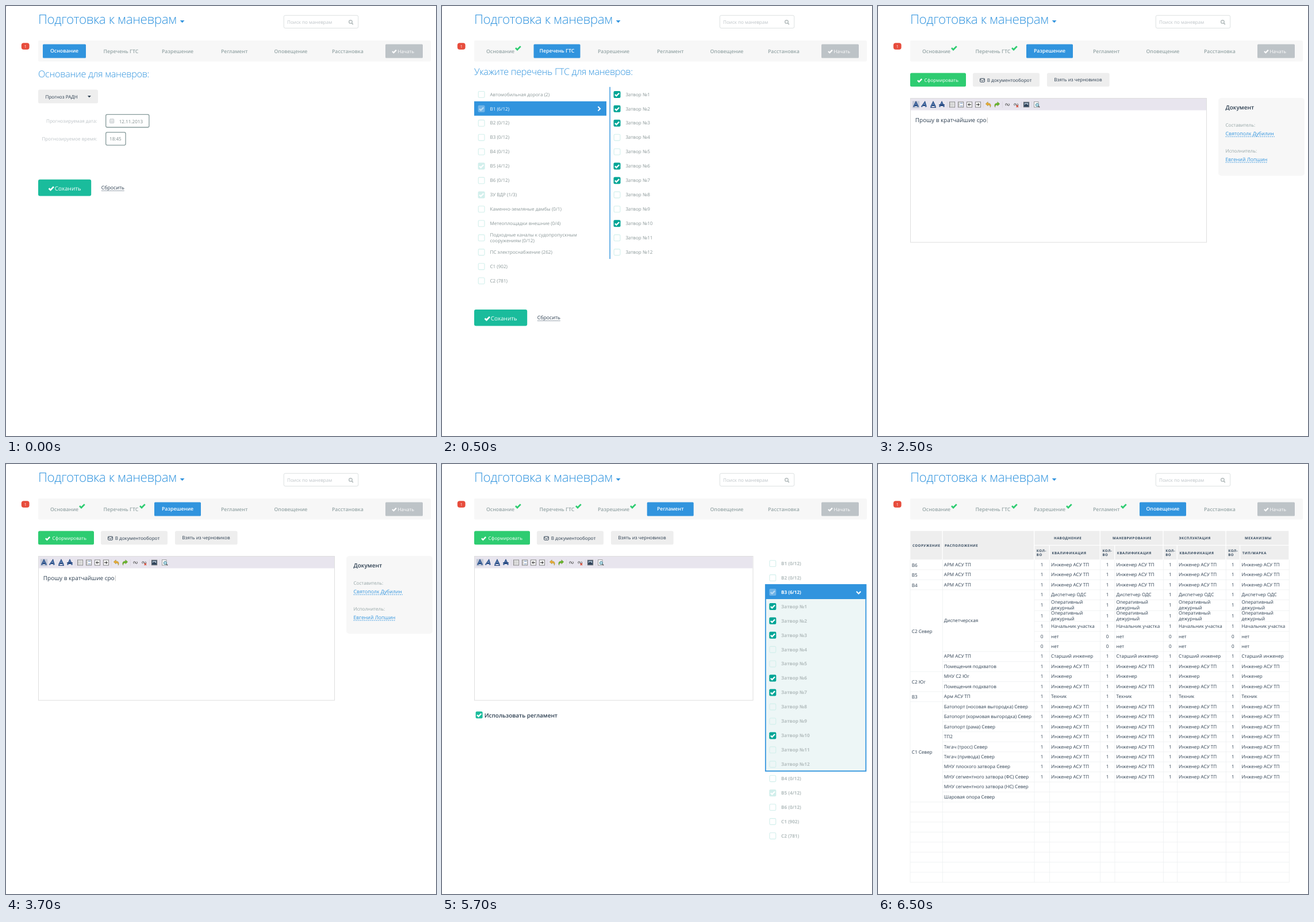
An HTML page that plays this animation: 748x748 px, repeating every 8 s.

```html
<!DOCTYPE html>
<html lang="ru">
<head>
<meta charset="utf-8">
<title>Подготовка к маневрам</title>
<style>
html, body { margin: 0; width: 100%; height: 100%; overflow: hidden; background: #fff; }
svg { display: block; width: 100%; height: 100%; font-family: "Open Sans", "Noto Sans", sans-serif; }
text { white-space: pre; text-rendering: geometricPrecision; }
.narrow { font-stretch: 75%; }
.title { letter-spacing: -.018em; }
.head { letter-spacing: .55px; }
</style>
</head>
<body>
<svg id="stage" viewBox="0 0 748 748"></svg>
<script>
const BLUE = '#3194de', GREEN = '#2ecc71', TEAL = '#1abc9c', DEEP = '#00a596';
const DARK = '#2c3e50', GREY = '#95a5a6', PALE = '#bdc3c7', MIST = '#d2efec', PANEL = '#eeeeee';
const S = 8.1, M = 8.73, L = 9.97;
const STEP = 24.94;

const text = (x, y, s, size = S, fill = DARK, weight = 400, extra = '') =>
  `<text x="${x}" y="${y}" font-size="${size}" fill="${fill}" font-weight="${weight}" ${extra}>${s}</text>`;
const title = (x, y, s, size) => text(x, y, s, size, BLUE, 300, 'class="title"');
const rect = (x, y, w, h, fill, r = 0, extra = '') =>
  `<rect x="${x}" y="${y}" width="${w}" height="${h}" rx="${r}" fill="${fill}" ${extra}/>`;
const frame = (x, y, w, h, color, r = 0, width = 1) =>
  rect(x, y, w, h, 'none', r, `stroke="${color}" stroke-width="${width}"`);
const line = (d, color, width = 1, extra = '') =>
  `<path d="${d}" fill="none" stroke="${color}" stroke-width="${width}" ${extra}/>`;
const fill = (d, color) => `<path d="${d}" fill="${color}"/>`;
const at = (x, y, s) => `<g transform="translate(${x} ${y})">${s}</g>`;
const tick = (x, y, color, k = 1) => at(x, y, line(`M${-3.6 * k} ${.1 * k}L${-1.1 * k} ${2.5 * k}L${3.7 * k} ${-2.4 * k}`, color, 2.3 * k));
const caret = (x, y, w, h, color) => fill(`M${x} ${y}h${w}l${-w / 2} ${h}z`, color);

// Checkbox states: 0 empty, 1 checked, 2 partly checked, 3 partly checked on blue
function box(x, y, state) {
  if (!state) return frame(x - 5.4, y - 5.4, 10.8, 10.8, MIST, 1.8, 1.1);
  const back = [, DEEP, MIST, 'rgba(255,255,255,.3)'][state];
  const mark = state === 3 ? 'rgba(255,255,255,.5)' : '#fff';
  return rect(x - 6, y - 6, 12, 12, back, 2) + tick(x, y, mark);
}

const TABS = [
  ['Основание', 77, 64, 75, 132], ['Перечень ГТС', 169.5, 159.5, 81, 237],
  ['Разрешение', 271, 258, 81, 332], ['Регламент', 374, 356.7, 81, 427],
  ['Оповещение', 466.5, 455, 81, 0], ['Расстановка', 567, 0, 0, 0]
];

function header() {
  return rect(0, 0, 1, 1, '#bbb')
    + title(56, 31.2, 'Подготовка к маневрам', 22.44)
    + caret(302.7, 25, 7.8, 4.2, BLUE)
    + frame(483.3, 16.3, 129.4, 22.2, '#dde1e2', 2.5)
    + text(489, 31, 'Поиск по маневрам', S, PALE)
    + `<circle cx="599.4" cy="27.6" r="2.8" fill="none" stroke="#b3bbbc" stroke-width="1.4"/>`
    + line('M601.4 29.6l2.4 2.5', '#b3bbbc', 1.7)
    + rect(26.8, 64.3, 13.8, 11.4, '#e74c3c', 4)
    + text(33.7, 72.6, '1', 7, '#fff', 400, 'text-anchor="middle"')
    + rect(56, 60, 683, 36.6, '#f7f7f7', 2)
    + rect(660, 66.4, 65, 24, PALE, 1.5)
    + tick(675.4, 78.9, '#fff', .95) + text(681.5, 81.6, 'Начать', S, '#fff');
}

function tabs(active) {
  return TABS.map(([name, x, left, width, mark], i) => {
    const on = i === active;
    return (on ? rect(left, 66.4, width, 24, BLUE, 1.5) : '')
      + text(x, on ? 81.1 : 81.6, name, M, on ? '#fff' : GREY, 600)
      + (i < active ? tick(mark + .3, 73, GREEN, 1.2) : '');
  }).join('');
}

const saveRow = y => rect(56, y, 92.2, 28.6, TEAL, 3)
  + tick(78.7, y + 15.4, '#fff', 1.15) + text(84.7, y + 18.8, 'Соханить', L, '#fff')
  + text(165.8, y + 17.2, 'Сбросить', M) + line(`M165.8 ${y + 19.6}h40`, '#7d8a96', .8);

function basis() {
  const end = 'text-anchor="end"', edge = '#869a9b';
  return title(56, 123.8, 'Основание для маневров:', 16.2)
    + rect(56, 145.5, 104, 23.7, PANEL, 2.5) + text(68.5, 160.9, 'Прогноз РАДН') + caret(141.9, 156, 6, 3.3, DARK)
    + text(158.4, 202.6, 'Прогнозируемая дата:', S, PALE, 400, end)
    + text(158.4, 233.6, 'Прогнозируемое время:', S, PALE, 400, end)
    + frame(173.7, 188.6, 75.2, 22.4, edge, 2.5, 1.3) + frame(173.7, 219.7, 34.4, 22.4, edge, 2.5, 1.3)
    + frame(180.7, 197, 7, 6.6, PALE, .5, .9)
    + line('M180.5 199.2h7.4M180.5 201.4h7.4M183 199v4.4M185.4 199v4.4', PALE, .6)
    + line('M182.6 195.8v1.8M185.8 195.8v1.8', PALE, 1.1)
    + text(196.7, 203.8, '12.11.2013', S, '#7f8c8d') + text(180, 233.8, '18:45', S, '#7f8c8d')
    + saveRow(301.8);
}

const GATES = Array.from({ length: 12 }, (_, i) => [`Затвор №${i + 1}`, [1, 2, 3, 6, 7, 10].includes(i + 1) ? 1 : 0]);

function listing() {
  const items = ['Автомобильная дорога (2)', 'В1 (6/12)', 'В2 (0/12)', 'В3 (0/12)', 'В4 (0/12)', 'В5 (4/12)',
    'В6 (0/12)', 'ЗУ ВДР (1/3)', 'Каменно-земляные дамбы (0/1)', 'Метеоплощадки внешние (0/4)',
    'Подходные каналы к судопропускным|сооружениям (0/12)', 'ПС электроснабжение (262)', 'С1 (902)', 'С2 (781)'];
  const state = { 1: 3, 5: 2, 7: 2 }, ink = '#8a9798';
  const left = items.map((name, i) => {
    const y = 153.9 + i * STEP, rows = name.split('|');
    return box(68.6, y, state[i])
      + rows.map((s, k) => text(83.5, y + 2.7 + (k - (rows.length - 1) / 2) * 10, s, S, i === 1 ? '#fff' : ink)).join('');
  }).join('');
  const right = GATES.map(([name, on], i) => {
    const y = 153.9 + i * STEP;
    return box(304.5, y, on) + text(319.4, y + 2.7, name, S, ink);
  }).join('');
  return title(56, 120.3, 'Укажите перечень ГТС для маневров:', 16.2)
    + rect(56, 165.8, 230, 25, BLUE) + left + right
    + line('M271.4 175l3.7 3.7l-3.7 3.7', '#fff', 2)
    + rect(291.4, 140.8, 1.4, 299.2, BLUE)
    + saveRow(528);
}

const letter = (x, extra) => at(x, 171.5,
  line('M-4 4L0 -4L4 4M-2.4 1.3H2.4', '#1d3f78', 2.2) + line('M-3.6 3.6L0 -3.6L3.6 3.6', '#6d9fd8', .7) + extra);
const sheet = (x, inner) => at(x, 171.5, rect(-4.6, -4.6, 9.2, 9.2, '#fafafa', 0, 'stroke="#777" stroke-width=".9"') + inner);

function toolbar(width) {
  const ink = '#555', rows = 'M-1.8 -2.4h5M-1.8 0h5M-1.8 2.4h5';
  const dots = line('M-3.5 -2.4h1M-3.5 0h1M-3.5 2.4h1', '#333', 1);
  const bend = 'M-4.8 -1.2L-.8 -4.8V-2.6C4 -2.6 5.4 1 3.2 4.8C3.4 1.6 2 .4 -.8 .4V2.4Z';
  const arrow = (x, k, color) => at(x, 171.5, `<path transform="scale(${k} 1)" d="${bend}" fill="${color}" stroke="#6f7a24" stroke-width=".4"/>`);
  const link = line('M-2 1.6a1.7 1.7 0 1 1 2 -2M2.2 -1.6a1.7 1.7 0 1 1 -2 2M-1 .8l2 -1.6', '#555', 1);
  return frame(56.5, 160.5, width, 250.6, '#dedede')
    + rect(57, 161, width - 1, 20.4, '#e8e5ee')
    + rect(59.8, 165.3, 12.4, 12.4, '#c5cad8')
    + letter(66, '') + at(81, 0, `<g transform="translate(36 0) skewX(-12)">${letter(0, '')}</g>`)
    + letter(96, line('M-5 5h10', '#1d3f78', 1.1)) + letter(111, line('M-5 .4h10', '#1d3f78', 1.4))
    + sheet(129, dots + line(rows, '#888', .7)) + sheet(144, dots + line('M-1.2 -2.4h4.4M-1.2 2.4h4.4', '#3a66a8', .8))
    + sheet(159, fill('M3 -.8H0V-2.8L-3 0L0 2.8V.8H3Z', ink)) + sheet(174, fill('M-3 -.8H0V-2.8L3 0L0 2.8V.8H-3Z', ink))
    + arrow(192, 1, '#edaa35') + arrow(207, -1, '#62b82c')
    + at(225, 171.5, link) + at(240, 171.5, link + line('M.6 1.2l3.4 3.4M4 1.2l-3.4 3.4', '#d8432c', 1.3))
    + at(258, 171.5, rect(-4.8, -4.4, 9.6, 8.8, '#344a63', 0, 'stroke="#777" stroke-width=".8"')
      + rect(-3.2, -2.8, 6.4, 3.4, '#a9b9c8') + fill('M-3.2 1.4L-.6 -1.6L3.2 1.4Z', '#26364a'))
    + at(276, 171.5, rect(-4.6, -4.8, 7.6, 9.4, '#fafafa', 0, 'stroke="#888" stroke-width=".8"')
      + `<circle cx=".9" cy=".6" r="2.5" fill="#bfe3ee" stroke="#3c7f95" stroke-width="1"/>` + line('M2.8 2.4l2.4 2.4', '#555', 1.4))
    + line('M120.4 166v11M183.2 166v11M216.4 166v11M249.4 166v11M267.4 166v11', '#d6d2dd', .7);
}

function actions() {
  return rect(56, 116.5, 97, 23.7, GREEN, 2.5) + tick(72.5, 129.3, '#fff') + text(80.6, 132, 'Сформировать', S, '#fff')
    + rect(165, 116.5, 116, 23.7, PANEL, 2.5) + frame(177.6, 126.2, 7.8, 6, DARK, .8, 1)
    + line('M177.8 127.4l3.7 2.9l3.7 -2.9', DARK, .9) + text(189.7, 132, 'В документооборот')
    + rect(294, 116.5, 108.6, 23.7, PANEL, 2.5) + text(306.2, 131.3, 'Взять из черновиков');
}

function permit() {
  const person = (y, role, name, width) => text(604.5, y, role, S, GREY) + text(604.5, y + 14.7, name, M, BLUE)
    + line(`M604.5 ${y + 17.2}h${width}`, BLUE, .9, 'stroke-dasharray="2.2 1.3"');
  return actions() + toolbar(515)
    + text(64.8, 202, 'Прошу в кратчайшие сро', L, DARK) + line('M190.3 194v9.6', '#aaa', .7)
    + rect(592, 160, 150, 135.3, '#f7f7f7', 5)
    + text(604.5, 180, 'Документ', L, DARK, 600)
    + person(210, 'Составитель:', 'Святополк Дубилин', 85.5)
    + person(254.8, 'Исполнитель:', 'Евгений Лопшин', 72);
}

function rules() {
  const rows = [['В1 (0/12)', 0], ['В2 (0/12)', 0], ['В3 (6/12)', 3], ...GATES,
    ['В4 (0/12)', 0], ['В5 (4/12)', 2], ['В6 (0/12)', 0], ['С1 (902)', 0], ['С2 (781)', 0]];
  const tree = rows.map(([name, state], i) => {
    const y = 173.1 + i * STEP;
    return box(575.3, y, state) + text(590, y + 2.8, name, S, i === 2 ? '#fff' : '#b4bebf', 700, 'class="narrow"');
  }).join('');
  return actions() + toolbar(484.5)
    + rect(58.6, 430.6, 12, 12, TEAL, 2) + tick(64.6, 436.6, '#fff')
    + text(73.7, 441.2, 'Использовать регламент', L, DARK, 600)
    + rect(562.8, 210, 174.6, 324.2, '#edf6f6', 0, `stroke="${BLUE}" stroke-width="1.8"`)
    + rect(562, 209.2, 176.2, 25.8, BLUE)
    + line('M721 221.8l3.7 3.7l3.7 -3.7', '#fff', 2) + tree;
}

const COLS = [56, 112.4, 272, 298.6, 386.6, 412, 496.4, 520.6, 605.4, 630, 715.4];
const ASU = 'Инженер АСУ ТП', DUTY = 'Оперативный|дежурный';
const PLACES = [
  ['АРМ АСУ ТП', ASU], ['АРМ АСУ ТП', ASU], ['АРМ АСУ ТП', ASU],
  ['', 'Диспетчер ОДС'], ['', DUTY], ['', DUTY], ['', 'Начальник участка'], ['', 'нет'], ['', 'нет'],
  ['АРМ АСУ ТП', 'Старший инженер'], ['Помещения подхватов', ASU],
  ['МНУ С2 Юг', 'Инженер'], ['Помещения подхватов', ASU], ['Арм АСУ ТП', 'Техник'],
  ['Батопорт (носовая выгородка) Север', ASU], ['Батопорт (кормовая выгородка) Север', ASU],
  ['Батопорт (рама) Север', ASU], ['ТП2', ASU], ['Тягач (тросс) Север', ASU], ['Тягач (привода) Север', ASU],
  ['МНУ плоского затвора Север', ASU], ['МНУ сегментного затвора (ФС) Север', ASU],
  ['МНУ сегментного затвора (НС) Север', ''], ['Шаровая опора Север', '']
];
const SITES = [['В6', 0, 1], ['В5', 1, 2], ['В4', 2, 3], ['С2 Север', 3, 11], ['С2 Юг', 11, 13], ['В3', 13, 14], ['С1 Север', 14, 24]];

function notice() {
  const tops = [166.5];
  for (let i = 0; i < 32; i++) tops.push(tops[i] + (i === 4 || i === 5 ? 18.75 : 17.453));
  const middle = (a, b) => (tops[a] + tops[b]) / 2 + 2.6;
  const cell = (a, b, y, h) => rect(COLS[a] + .3, y, COLS[b] - COLS[a] - 1.3, h, PANEL);
  const head = (x, y, s) => text(x, y, s, 6, '#34495e', 700, 'class="head"');
  let out = cell(0, 1, 116.5, 49.7) + cell(1, 2, 116.5, 49.7)
    + head(60, 143.8, 'СООРУЖЕНИЕ') + head(116, 143.8, 'РАСПОЛОЖЕНИЕ');

  [['НАВОДНЕНИЕ', 306], ['МАНЕВРИРОВАНИЕ', 408], ['ЭКСПЛУАТАЦИЯ', 523.5], ['МЕХАНИЗМЫ', 638]].forEach(([name, x], i) => {
    const c = 2 + i * 2;
    out += cell(c, c + 2, 116.5, 24.3) + cell(c, c + 1, 142, 24.2) + cell(c + 1, c + 2, 142, 24.2)
      + head(x, 131.3, name) + head(COLS[c] + 3.8, 152.6, 'КОЛ-') + head(COLS[c] + 3.8, 160, 'ВО')
      + head(COLS[c + 1] + 3.8, 156.5, i < 3 ? 'КВАЛИФИКАЦИЯ' : 'ТИП/МАРКА');
  });

  let grid = '';
  for (let i = 1; i <= 32; i++) {
    const joined = SITES.some(([, a, b]) => i > a && i < b);
    const from = i > 3 && i < 9 ? COLS[2] : joined ? COLS[1] : COLS[0];
    grid += `M${from} ${tops[i]}H${COLS[10]}`;
  }
  COLS.forEach(x => { grid += `M${x} 166.5V${tops[32]}`; });
  out += line(grid, '#ebeef0', .7);

  SITES.forEach(([name, a, b]) => { out += text(58.8, middle(a, b) + 1.1, name); });
  out += text(114.8, middle(3, 9), 'Диспетчерская');
  PLACES.forEach(([place, role], i) => {
    const y = middle(i, i + 1), rows = role.split('|');
    out += text(114.8, y, place);
    if (!role) return;
    for (let c = 2; c < 10; c += 2) {
      out += text((COLS[c] + COLS[c + 1]) / 2 - .3, y, role === 'нет' ? 0 : 1, S, DARK, 400, 'text-anchor="middle"');
      rows.forEach((s, k) => { out += text(COLS[c + 1] + 2.5, y + (k - (rows.length - 1) / 2) * 9.8, s); });
    }
  });
  return out;
}

const SCENES = [basis, listing, permit, rules, notice];
const STARTS = [0, 500, 2500, 4500, 6500], LOOP = 8000;
const stage = document.getElementById('stage');
stage.innerHTML = header() + SCENES.map((draw, i) => `<g class="scene" display="none">${tabs(i)}${draw()}</g>`).join('');
const groups = stage.querySelectorAll('.scene');

function render(ms) {
  const t = ms % LOOP;
  const now = STARTS.filter(s => s <= t).length - 1;
  groups.forEach((g, i) => g.setAttribute('display', i === now ? 'inline' : 'none'));
}

const begin = performance.now();
function play() {
  render(performance.now() - begin);
  requestAnimationFrame(play);
}
play();
</script>
</body>
</html>
```
